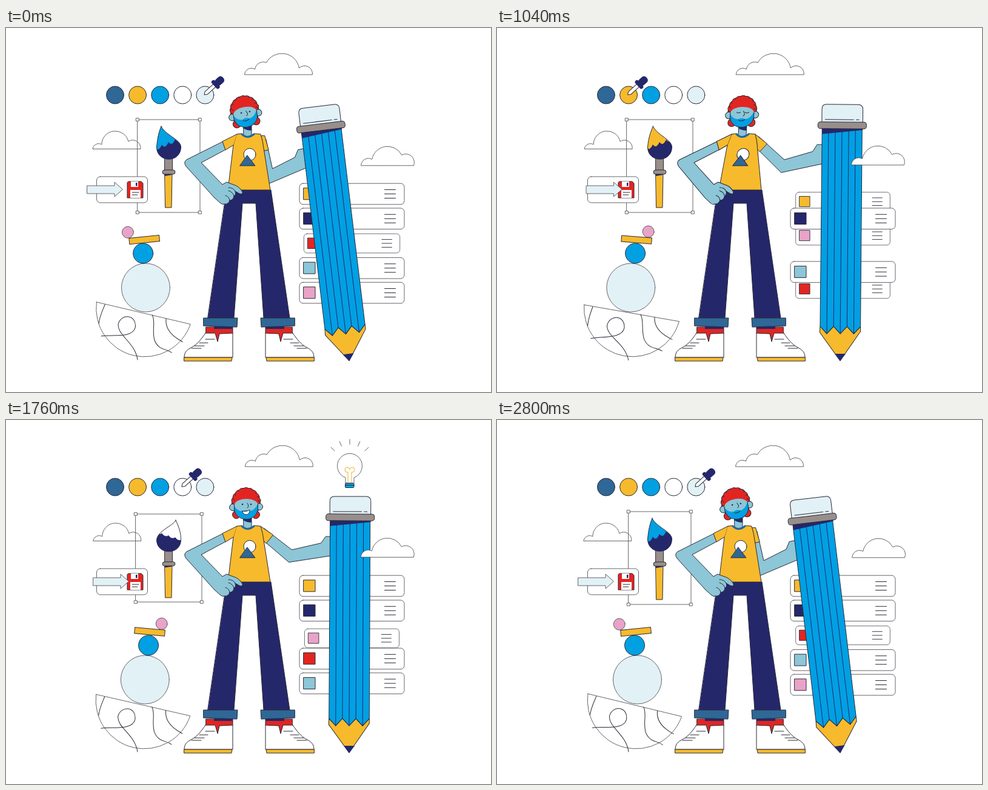
These frames come from a looping animation (800 px wide and 600 px high, 2.88 s). An HTML page:

```html
<!DOCTYPE html>
<html lang="en">
<head>
<meta charset="utf-8">
<title>Designer with a big pencil</title>
<style>
  html, body { margin: 0; width: 100%; height: 100%; overflow: hidden; background: #fff; }
  svg { display: block; width: 800px; height: 600px; }
  svg * { stroke-linejoin: round; stroke-linecap: round; }
  .ink { stroke: #292937; }
  .thin { stroke: #55555c; stroke-width: .9; }
  .line { fill: none; }
  .navy { fill: #25276b; }
  .denim { fill: #2f6796; }
  .blue { fill: #00a0e3; }
  .pale { fill: #e2f1f6; }
  .skin { fill: #8cc6d7; }
  .yellow { fill: #f7ba2c; }
  .red { fill: #e22521; }
  .pink { fill: #eaa3c8; }
  .gray { fill: #988f8b; }
  .white { fill: #fff; }
  .collar { fill: none; stroke: #22669f; stroke-width: 3; }
</style>
</head>
<body>
<svg viewBox="0 0 800 600" xmlns="http://www.w3.org/2000/svg">
  <defs>
    <clipPath id="bristleClip"><path id="bristleShape"/></clipPath>
    <g id="foot">
      <path class="red ink" d="M330 493H374V504H352L349 518 345 504H330Z"/>
      <path class="navy" d="M343 492H374V496H343Z"/>
      <path class="white ink" d="M329 503H345L349 517 352 504 374 503V543H294C294 534 299 530 307 526 316 521 322 513 329 503Z"/>
      <path class="yellow ink" d="M294 543H373L372 549H294Z"/>
      <path class="ink line" d="M329 513H344M319 519H333M311 524H327M306 528H322"/>
      <path class="denim ink" d="M326 478H382L381 493 326 491Z"/>
    </g>
  </defs>

  <path id="cloudTop" class="white thin" d="M394 76.5A11 11 0 0 1 411 68 14 14 0 0 1 430 57 29 29 0 0 1 484 66 13 13 0 0 1 506 76.5Z"/>
  <path id="cloudLeft" class="white thin" d="M143 199A10 10 0 0 1 158 192 22.3 22.3 0 0 1 202 187 13 13 0 0 1 222 199Z"/>

  <g id="swatches"></g>
  <g id="dropper">
    <g transform="translate(327 110) rotate(-42)">
      <path class="white ink" d="M0 0 4-3H24V3H4Z"/>
      <rect class="navy" x="22" y="-8.5" width="6.5" height="17" rx="3"/>
      <rect class="navy" x="26" y="-6" width="16" height="12" rx="5"/>
    </g>
  </g>

  <rect id="frame" class="thin line"/>
  <g id="handles" class="thin white"></g>
  <g id="brush">
    <path class="yellow ink" d="M262 240H274L273 296H263Z"/>
    <path class="navy" d="M262 240H274V242L262 244Z"/>
    <rect class="gray ink" x="262" y="212" width="12.5" height="24"/>
    <rect class="gray ink" x="258" y="234" width="21" height="7" rx="3.5"/>
    <path id="bristle"/>
    <path id="dip" class="navy" clip-path="url(#bristleClip)"/>
  </g>

  <rect class="white thin" x="149.5" y="245" width="84" height="43" rx="6"/>
  <g>
    <path class="red ink" d="M202 253H223L226 256V280H200V255Z"/>
    <path class="white" d="M206 253H218V262H206ZM205 267H222V280H205Z"/>
    <path class="ink line" d="M208 271H219M208 275H217"/>
    <rect class="navy" x="214" y="255" width="2.5" height="5.5"/>
  </g>
  <path id="arrow" class="pale thin" d="M134 260H179V254L192.5 266 179 278V273H134Z"/>

  <g id="bowl">
    <path class="white thin" d="M149 452 304 488A80 80 0 0 1 149 452Z"/>
    <path class="ink line" d="M163 456C158 468 154 476 153 487M157 508C175 505 208 512 213 494 216 472 190 470 185 488 183 507 213 518 217 547M241 473C247 484 240 498 245 515 252 532 265 528 273 535M264 479C262 495 272 507 291 517"/>
  </g>
  <circle id="ballBig" class="pale thin" cy="428" r="40"/>
  <circle id="ballBlue" class="blue ink" cy="371.4" r="16.5"/>
  <g id="plank">
    <rect class="yellow ink" x="-25" y="-5" width="50" height="10"/>
    <circle id="ballPink" class="pink thin" cy="-15" r="9.5"/>
  </g>

  <g id="rows"></g>

  <path class="navy ink" d="M364 267H437L468 478H425L412 289H390L376 478H333Z"/>
  <use href="#foot"/>
  <use href="#foot" transform="matrix(-1 0 0 1 802 0)"/>

  <path id="arm" class="skin ink"/>
  <path id="sleeve" class="yellow ink"/>

  <g id="upper">
    <path class="skin ink" d="M392 158H405V176Q398 183 392 176Z"/>
    <path class="navy" d="M391 162H405V169Q397 169 391 165Z"/>
    <path class="yellow ink" d="M381 175 389 174Q398 184 409 174L420 175Q424 188 425 198L436 267H366L375 193Z"/>
    <path class="collar" d="M389 175Q398 184 409 175"/>
    <circle class="white ink" cx="402" cy="208.5" r="10"/>
    <path class="denim ink" d="M398 210 411 227H386Z"/>
    <path class="skin ink" d="M358 187 298 217Q292 221 297 228L344 280 353 288Q357 292 361 290 367 291 369 284 375 284 376 277 380 275 378 269L385 273Q391 275 390 270 386 263 380 260L364 254 357 258 322 222 363 200Z"/>
    <path class="ink line" d="M369 284Q368 278 362 276M376 277Q375 271 367 268M378 269Q375 263 367 263"/>
    <path class="yellow ink" d="M381 175 357 187 362 201 375 193"/>
    <g id="head">
      <g id="hair" class="red ink"></g>
      <circle class="red" cy="-10" r="19"/>
      <circle class="skin ink" cx="-22" cy="2" r="5.5"/>
      <circle class="skin ink" cx="22" cy="1" r="5.5"/>
      <path class="skin" d="M-19.5-2C-16-15 16-15 19.5-3V5C17 27-17 27-19.5 5Z"/>
      <path class="blue" d="M-19.5-1C-17 5-11 9-5 8Q0 5 5 8C12 8 17 2 19.5-5V4C17 27-17 27-19.5 4Z"/>
      <path class="ink line" d="M19.5-3V5C17 27-17 27-19.5 5V-2M2-5Q6 1 2 3"/>
      <g id="eyesOpen" class="navy"><circle cx="-6" cy="-3" r="1.3"/><circle cx="8" cy="-3" r="1.3"/></g>
      <path id="eyesShut" class="ink line" d="M-9-3Q-6-1-3-3M5-3Q8-1 11-3"/>
      <path id="calm" class="ink line" d="M-5 10Q0 13 5 9"/>
      <path id="smile" class="white ink" d="M-6 8Q0 10 6 6 6 14 0 14-5 14-6 8Z"/>
    </g>
  </g>

  <g id="pencil">
    <path id="wood" class="yellow ink"/>
    <path class="navy" d="M557 537H575L566 549Z"/>
    <path id="paint" class="blue ink"/>
    <path id="stripes" class="line" stroke="#25276b"/>
    <path class="navy" d="M533 164H600V168L533 175Z"/>
    <path class="pale ink" d="M532.5 156V134Q532.5 126 540 126H592Q600 126 600 134V156Z"/>
    <path class="ink line" d="M538 151H585M589 151H594"/>
    <rect class="gray ink" x="526" y="155" width="80" height="11" rx="4"/>
  </g>

  <g id="bulb">
    <path class="white thin" d="M560 104V95A20.5 20.5 0 1 1 574 95V104Z"/>
    <path d="M564 103V86A4 4 0 1 1 567 82 4 4 0 1 1 570 86V103" fill="none" stroke="#f0c04c" stroke-width="1.2"/>
    <rect class="blue ink" x="559.5" y="104" width="14.5" height="7.5" rx="1.5"/>
    <path class="ink" d="M560 107.5H574"/>
  </g>
  <path id="rays" class="thin line"/>
  <path id="cloudRight" class="white thin" d="M586 226A12 12 0 0 1 604 216 26.2 26.2 0 0 1 653 209 14 14 0 0 1 673 226Z"/>
</svg>

<script>
const LOOP = 2880, STEP = 80, BEAT = LOOP / 4, HALF = LOOP / 2;
const el = id => document.getElementById(id);
const set = (node, attrs) => { for (const k in attrs) node.setAttribute(k, attrs[k]); };
const move = (id, x, y = 0, more = '') => set(el(id), { transform: `translate(${x} ${y}) ${more}` });
const show = (id, on) => { el(id).style.display = on ? '' : 'none'; };
const range = n => [...Array(n).keys()];
const rad = deg => deg * Math.PI / 180;
const add = (parent, tag, attrs) => {
  const node = document.createElementNS('http://www.w3.org/2000/svg', tag);
  set(node, attrs);
  return parent.appendChild(node);
};

// Timing: a smooth step, a step there and back, and a slow swing.
const ease = (t, start, time = 320) => {
  const u = Math.min(1, Math.max(0, (t - start) / time));
  return u * u * (3 - 2 * u);
};
const pulse = (t, on, off, time) => ease(t, on, time) - ease(t, off, time);
const wave = (t, peak, period = LOOP) => Math.cos((t - peak) / period * 2 * Math.PI);

// Palette: the dropper visits one swatch per beat and the brush follows.
const swatches = ['denim', 'yellow', 'blue', 'white', 'pale'], GAP = 37.1;
const stops = [4, 1, 3, 2];
swatches.forEach((color, i) =>
  add(el('swatches'), 'circle', { class: color + ' ink', cx: 180 + GAP * i, cy: 110.5, r: 14.5 }));

function drawDropper(t) {
  const at = stops.reduce((pos, stop, i) =>
    pos + (stops[(i + 1) % 4] - stop) * ease(t, BEAT * (i + 1) - 320, 240), stops[0]);
  move('dropper', GAP * (at - stops[0]));
}

const corners = [[-1, -1], [1, -1], [-1, 1], [1, 1]].map(([sx, sy]) =>
  ({ sx, sy, node: add(el('handles'), 'rect', { width: 4.6, height: 4.6 }) }));

function drawBrush(t) {
  const w = 51.5 + 3 * pulse(t, 560, 2360) + 3 * pulse(t, 1840, 2360);
  const h = 76.5 - 4 * pulse(t, 1120, 2360);
  set(el('frame'), { x: 268.5 - w, y: 227.5 - h, width: 2 * w, height: 2 * h });
  for (const c of corners) set(c.node, { x: 266.2 + c.sx * w, y: 225.2 + c.sy * h });

  const bend = 2 * pulse(t % HALF, 40, 800, 280) - 1, tip = 268 + 12 * bend;
  const shape = `M${tip} 162C${tip - 4} 172 250 180 248.5 196C248.500 223 288.500 223 288.500 196C288.500 184 ${tip + 6} 176 ${tip} 162Z`;
  const color = swatches[stops[Math.floor((t + LOOP - 240) / BEAT) % 4]];
  set(el('bristleShape'), { d: shape });
  set(el('bristle'), { d: shape, class: color + ' ink' });
  set(el('dip'), { d: `M246 ${189 - 8 * bend}${`q5.5 8 11 ${4 * bend - .5}`.repeat(4)}V222H246Z` });
  move('brush', 0, 229, `scale(1 ${.12 + .88 * h / 76.5}) translate(0 -229)`);
}

// Layer list: each shuffle gives a new order; rows named in "back" shrink for a while.
const START = 'YNRLP';
const shuffles = [
  { at: 60, order: 'PNYRL', back: 'PY' },
  { at: 785, order: 'YNPLR', back: 'YPR' },
  { at: 1226, order: 'YNPRL', back: 'L' },
  { at: 1710, order: START, back: 'P' },
  { at: 1960, order: START, back: 'N' },
  { at: 2540, order: START, back: 'R' }
];
const layers = { R: 'red', P: 'pink', Y: 'yellow', L: 'skin', N: 'navy' };
const rows = Object.keys(layers).map(key => {
  const node = add(el('rows'), 'g', {});
  add(node, 'rect', { class: 'white thin', x: -86.5, y: -17.3, width: 173, height: 34.6, rx: 6 });
  add(node, 'rect', { class: layers[key] + ' ink', x: -79.5, y: -9.7, width: 19, height: 19 });
  add(node, 'path', { class: 'ink line', d: 'M54-7H72M54 0H72M54 7H72' });
  return { key, node };
});

function drawRows(t) {
  for (const { key, node } of rows) {
    let order = START, slot = order.indexOf(key), size = 1;
    for (const s of shuffles) {
      slot += (s.order.indexOf(key) - order.indexOf(key)) * ease(t, s.at, 340);
      order = s.order;
      if (!s.back.includes(key)) continue;
      for (const time of [t, t + LOOP])
        size -= .1 * (ease(time, s.at - 60, 120) - ease(time, s.at + 300, 160));
    }
    set(node, { transform: `translate(570.5 ${273.5 + 40.75 * slot}) scale(${size})` });
  }
}

// Pencil: five stripes run into a row of teeth.
const edge = i => 532.5 + 11.1 * i;
const tooth = i => `${edge(i)} ${i % 2 ? 504 : 492}`;
const teeth = range(7).map(tooth).join(' ');
set(el('paint'), { d: `M599 164H533L${teeth}Z` });
set(el('wood'), { d: `M${teeth}V500L566 548.5 532 502Z` });
set(el('stripes'), { d: range(5).map(i => `M${edge(i + 1)} 166L${tooth(i + 1)}`).join('') });

for (const i of range(13)) {
  const a = rad(-210 + i * 20);
  add(el('hair'), 'circle', { cx: 17.5 * Math.cos(a), cy: -6 + 18 * Math.sin(a), r: 6.7 });
}
for (const x of [-16, 16]) add(el('hair'), 'circle', { cx: x, cy: 14, r: 6.5 });

// Two-bone arm from the shoulder to the grip on the pencil.
function drawArm(lean, angle) {
  const c = Math.cos(rad(angle)), d = Math.sin(rad(angle));
  const hx = 566 - 33 * c + 338 * d, hy = 548 - 33 * d - 338 * c;
  const sx = 421 + lean * .9, sy = 185, upper = 62, fore = 67;
  const dist = Math.hypot(hx - sx, hy - sy), ux = (hx - sx) / dist, uy = (hy - sy) / dist;
  const along = (upper ** 2 - fore ** 2 + dist ** 2) / (2 * dist);
  const drop = Math.sqrt(Math.max(0, upper ** 2 - along ** 2));
  const ex = sx + ux * along - uy * drop, ey = sy + uy * along + ux * drop;

  // Point on a limb: distance along it and offset to its upper side.
  const limb = (x, y, x2, y2) => {
    const l = Math.hypot(x2 - x, y2 - y), ax = (x2 - x) / l, ay = (y2 - y) / l;
    return (p, q) => [x + ax * p + ay * q, y + ay * p - ax * q];
  };
  const a = limb(sx, sy, ex, ey), b = limb(ex, ey, hx, hy);
  const [n1x, n1y] = a(0, 1), [n2x, n2y] = b(0, 1);
  let mx = n1x - sx + n2x - ex, my = n1y - sy + n2y - ey;
  const k = 2 * 9.5 / (mx * mx + my * my);
  mx *= k; my *= k;
  const poly = pts => `M${pts.map(p => p.join(' ')).join('L')}Z`;
  set(el('arm'), { d: poly([a(0, 8), [ex + mx, ey + my], b(54, 10), b(64, 19),
    b(76, 16), b(76, -14), b(67, -14), [ex - mx, ey - my], a(0, -8)]) });
  set(el('sleeve'), { d: poly([a(-6, 7), a(18, 9), a(18, -9), a(-8, -8)]) });
}

function drawPerson(t) {
  const lean = 6 * pulse(t, 160, 1040, 480) + 2.5 * pulse(t, 1800, 2400);
  const upright = pulse(t, 160, 2240, 600);
  const angle = -6.9 + upright * (7.2 + .2 * wave(t, 1080, LOOP / 3));
  const turn = pulse(t, 80, 2320);
  set(el('upper'), { transform: `matrix(1 0 ${-lean / 91} 1 ${267 * lean / 91} 0)` });
  move('head', 394.5 + 1.5 * turn, 142, `rotate(${9 * turn - 9})`);
  set(el('pencil'), { transform: `rotate(${angle} 566 548)` });
  drawArm(lean, angle);

  const happy = t >= 1200 && t < 2320, blink = t >= 960 && t < 1120;
  show('smile', happy);
  show('calm', !happy);
  show('eyesShut', blink);
  show('eyesOpen', !blink);
}

function drawStack(t) {
  const roll = 2.4 * wave(t, 2360) - .85;
  const big = 230 + 2.9 * roll, blue = big + 2 + 6.5 * wave(t, 1320);
  move('bowl', 1.4 * roll, 0, `rotate(${roll} 226.5 470)`);
  set(el('ballBig'), { cx: big });
  set(el('ballBlue'), { cx: blue });
  move('plank', blue + 2, 349, `rotate(${.5 + 6.3 * wave(t, 1430)})`);
  set(el('ballPink'), { cx: 26 * wave(t, 1400) });
}

function drawIdea(t) {
  const size = pulse(t, 1120, 2240, 200);
  show('bulb', size > 0);
  move('bulb', 567, 112, `scale(${size}) translate(-567 -112)`);
  const inner = 29 + 14 * ease(t, HALF, BEAT), outer = 29 + 14 * ease(t, 1240, 200);
  show('rays', outer > inner);
  set(el('rays'), { d: range(5).map(i => {
    const a = rad(23 * (i - 2)), x = Math.sin(a), y = -Math.cos(a);
    return `M${567 + x * inner} ${75 + y * inner}L${567 + x * outer} ${75 + y * outer}`;
  }).join('') });
}

function draw(t) {
  drawDropper(t);
  drawBrush(t);
  drawRows(t);
  drawPerson(t);
  drawStack(t);
  drawIdea(t);
  move('arrow', 20 * pulse(t % HALF, 150, 910, 340));
  move('cloudTop', .5 * wave(t, HALF));
  move('cloudLeft', .5 + .7 * wave(t, 1200));
  move('cloudRight', .7 * wave(t, 2400) - .7, .5 * wave(t, 2600));
}

const start = performance.now();
function tick() {
  const t = (performance.now() - start) % LOOP;
  draw(Math.floor(t / STEP) * STEP);
  requestAnimationFrame(tick);
}
tick();
</script>
</body>
</html>
```
